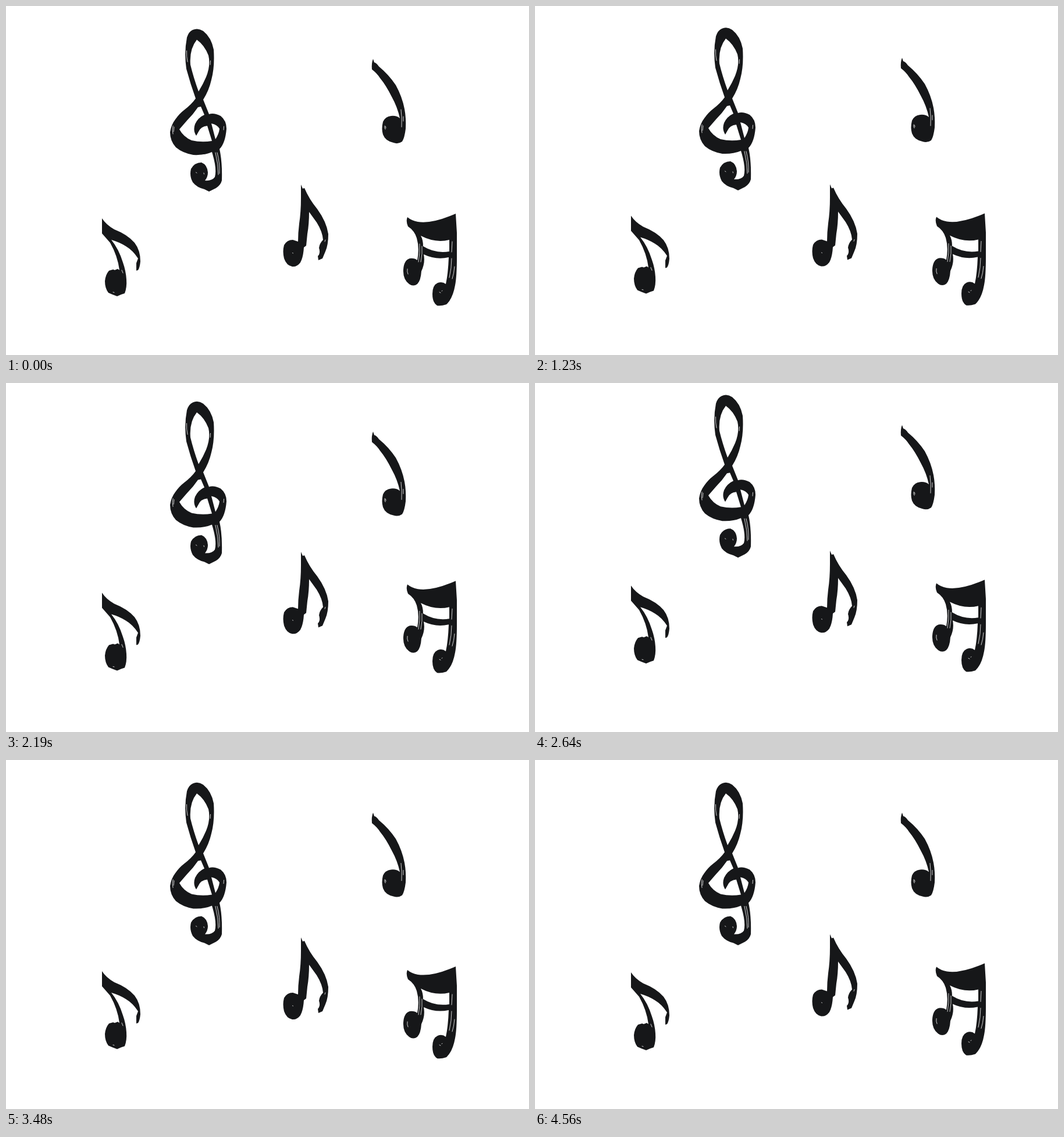
Write an HTML page that moves like this. It is 899x600 px and loops after 4590 ms.

```html
<!DOCTYPE html>
<html lang="en">
<head>
<meta charset="utf-8">
<title>Dancing notes</title>
<style>
  html, body { margin: 0; width: 100%; height: 100%; overflow: hidden; background: #fff; }
  svg { display: block; width: 899px; height: 600px; }
  .ink { fill: #161719; fill-rule: evenodd; }
  .shine { fill: none; stroke: #fff; stroke-width: .8; stroke-linecap: round; }
</style>
</head>
<body>
<svg viewBox="0 0 899 600">
  <!-- treble clef and quarter note -->
  <g data-start="2">
    <path class="ink" d="M321 41 Q330 37 339 43 Q353 54 357 75 Q359 105 353 127
      Q349 145 339 161 L349 186 Q357 183 369 189 Q379 197 379 211 Q377 236 367 246
      Q372 268 371 300 Q369 308 361 313 L349 319 L341 315 Q328 312 321 303
      Q315 292 318 280 Q324 269 336 269 Q346 273 347 286 Q347 294 342 300
      Q354 301 359 294 Q363 280 354 251 Q340 257 322 256 Q304 253 292 243
      Q282 232 282 217 Q284 204 291 195 Q298 185 306 179 Q319 169 326 159
      Q317 134 310 108 Q306 80 311 54 Q314 44 321 41 Z
      M328 58 Q341 67 348 85 Q352 102 344 122 Q339 134 331 147
      Q322 122 317 101 Q315 74 328 58 Z
      M330 174 Q322 186 311 197 L298 212 Q305 225 319 231 Q336 235 354 232
      L346 206 Q335 207 331 216 L327 223 Q321 214 325 203 Q330 192 341 187 L335 173 Z
      M353 202 Q363 204 367 211 Q366 220 360 229 Z"/>
    <path class="shine" d="M310.500 77 Q310 87 312 96 M351.500 94 L351 101
      M287 206 Q285 213 287 220 M289 208 L288 216 M374.500 207 L374 213
      M360 252 Q365 272 365 290 M363 252 Q368 272 367 288"/>
    <path class="shine" stroke-width="2" d="M326.500 286 l1.500 1 M340 287 l.5 2"/>

    <path class="ink" d="M631 91 L633 97 Q637 98 641 104 Q658 118 670 136
      Q681 156 685 177 Q688 193 687 211 Q685 227 681 233 Q674 238 666 235
      Q652 232 648 221 Q645 211 648 199 Q652 190 662 189 Q671 188 677 193
      Q673 174 663 156 Q653 136 643 124 Q638 116 629 109 Q628 98 631 91 Z"/>
    <path class="shine" d="M679 178 Q681 193 680 208 M683 190 L683 198"/>
    <path class="shine" d="M651 206 Q650 209 652 212 M652.500 207 L653 210"/>
  </g>

  <!-- eighth note, middle, and beamed pair -->
  <g data-start="5">
    <path class="ink" d="M507 307 L510 314 L513 313 Q521 332 535 349 Q551 371 554 392
      Q554 411 549 422 L544 434 L537 437 L536 430 Q541 425 538 416 Q539 408 545 402
      Q544 388 534 372 L521 354 Q521 375 518 392 L516 412 L512 415
      Q511 432 506 441 Q500 449 492 448 Q482 446 478 434 Q475 422 478 411
      Q483 402 493 402 L502 405 Q502 390 504 374 Q507 354 507 330 Z"/>
    <path class="shine" d="M492.500 424.500 l1 .5 M549 402 L548 405"/>

    <path class="ink" d="M690 363 Q697 369 708 371 Q732 375 773 357 L775 390 L775 432
      Q775 465 772 480 Q768 503 757 513 Q748 516 741 515 Q733 510 733 495
      Q733 480 742 476 Q750 473 756 478 Q760 460 761 432 Q739 437 718 427
      Q721 441 714 456 Q713 472 707 478 Q700 483 693 478 Q682 470 683 453
      Q684 437 694 434 Q702 433 707 437 Q711 416 706 399 Q702 386 691 379
      Q687 370 690 363 Z
      M713 395 Q717 402 717 413 Q738 426 762 422 L762 402 Q738 408 713 395 Z"/>
    <path class="shine" d="M711 409 Q712 425 709 440 M715 413 Q716 426 713 440
      M767 405 L766 423 M766 434 Q766 450 762 467 M771 448 Q770 460 767 469
      M690 452 Q689 457 691 461 M745 492 l2 1 M749 490 l1 -.5"/>
  </g>

  <!-- eighth note, left -->
  <g data-start="1">
    <path class="ink" d="M165 365 Q172 376 186 384 Q209 393 221 407 Q231 420 231 439
      Q230 450 227 454 L224 455 L224 442 L227 434 Q218 420 206 413 Q195 406 181 402
      Q194 418 201 441 Q206 455 207 470 Q208 484 204 494 L198 496 L191 499
      L183 496 L176 493 Q170 485 170 473 Q171 462 177 455 L184 453 L187 454
      L192 452 L195 454 Q192 430 179 407 L172 399 L165 391 Z"/>
    <path class="shine" d="M199 454 L201 459 M184 492 l2 .5"/>
  </g>
</svg>
<script>
  const FRAME = 30, FRAMES = 153, PERIOD = 19, HEIGHT = 20, SKIP_AT = 36;
  const groups = [...document.querySelectorAll('g')];
  const begin = performance.now();

  // Each group rests until its start, then bobs on a cosine.
  function lift(step, start) {
    const d = Math.max(0, step - start);
    return -HEIGHT / 2 * (1 - Math.cos(2 * Math.PI * d / PERIOD));
  }

  function draw(now) {
    const n = Math.floor(Math.max(0, now - begin) / FRAME) % FRAMES;
    const step = n < SKIP_AT ? n : n + 1;
    for (const g of groups)
      g.setAttribute('transform', `translate(0 ${lift(step, +g.dataset.start).toFixed(2)})`);
    requestAnimationFrame(draw);
  }
  draw(begin);
</script>
</body>
</html>
```
